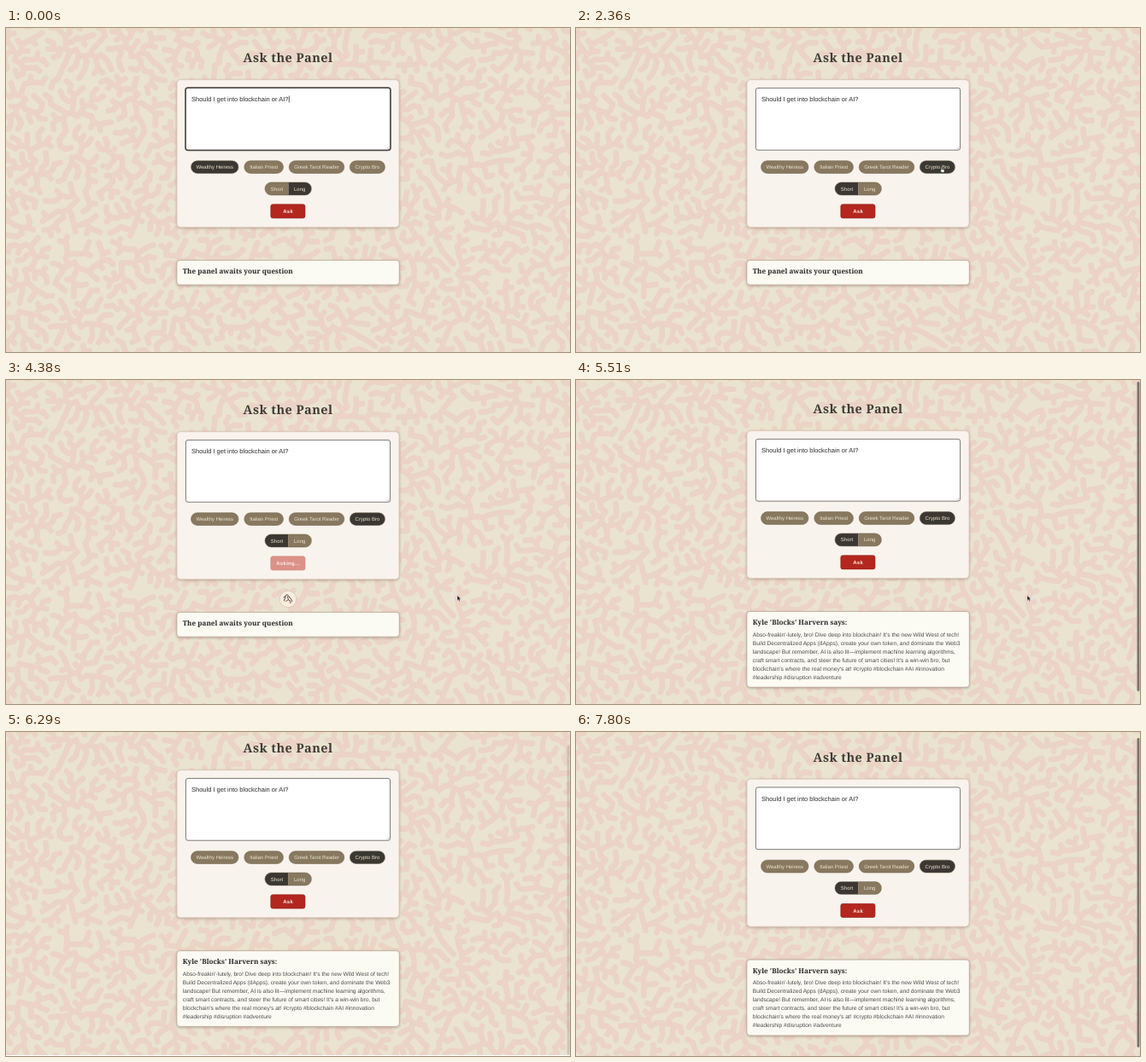
Animation, 660 px wide and 380 px high, one loop 8 s. Source, as an HTML page:

```html
<!DOCTYPE html>
<html lang="en">
<head>
<meta charset="utf-8">
<title>Ask the Panel</title>
<style>
  :root { --tan: #87785f; --dark: #3b3832; --red: #b3271f; }
  html, body { margin: 0; width: 100%; height: 100%; overflow: hidden; background: #fff; }
  svg { display: block; }
  text { font-family: "Liberation Sans", Arial, sans-serif; text-rendering: geometricPrecision; white-space: pre; }

  .serif { font-family: "Noto Serif", Georgia, serif; font-weight: 700; fill: #403c35; }
  .title { font-size: 14.5px; letter-spacing: .4px; text-anchor: middle; }
  .heading { font-size: 8.15px; fill: #2b2925; }
  .question { font-size: 7.5px; fill: #2e2c2a; }
  .answer { font-size: 6.67px; fill: #504e4c; }
  .label { font-size: 6px; fill: #ece3d0; text-anchor: middle; }
  .ask { font-weight: 700; letter-spacing: .3px; fill: #fbeee8; }
  .pill { fill: var(--tan); stroke: #6b5d47; stroke-width: .5; }
  .card { filter: drop-shadow(0 1px 1.5px rgba(90, 65, 45, .35)); stroke-width: .8; }

  /* One 8 s clock: 1% is 80 ms. */
  .page, .thumb, .bar, .cursor { animation: 8s linear infinite; }
  .page { animation-name: scroll; }
  .thumb { animation-name: thumb; }
  .bar { animation-name: bar; }
  .cursor { animation-name: point; animation-timing-function: ease-in-out; }
  .switch { animation: 8s step-end infinite; }
  .heiress { animation-name: heiress; }
  .bro { animation-name: bro; }
  .short { animation-name: short; }
  .long { animation-name: long; }
  .focus { animation-name: focus; }
  .caret { animation-name: caret; }
  .idle { animation-name: idle; }
  .busy { animation-name: busy; }
  .before { animation-name: before; }
  .after { animation-name: after; }
  .shown { animation-name: shown; }
  .arrow { animation-name: arrow; }
  .hand { animation-name: hand; }
  .spin { transform-origin: 330px 257px; animation: spin 2s linear infinite; }

  @keyframes scroll {
    0%, 68.8% { transform: translateY(0); }
    68.875% { transform: translateY(-1px); }
    70.75%, 79% { transform: translateY(-16px); }
    81.4%, 92.75% { transform: translateY(-14.5px); }
    97.5%, 100% { transform: translateY(-5.5px); }
  }
  @keyframes thumb {
    0%, 68.875% { transform: translateY(1px); }
    70.75%, 79% { transform: translateY(15px); }
    81.4%, 92.75% { transform: translateY(14px); }
    97.5%, 100% { transform: translateY(6px); }
  }
  @keyframes bar {
    0%, 68.8% { opacity: 0; }
    68.875%, 77.1% { opacity: 1; }
    78.6% { opacity: .25; }
    80%, 92.9% { opacity: 0; }
    93.6%, 100% { opacity: 1; }
  }
  @keyframes point {
    0%, 1.5% { transform: translate(390px, 262px); }
    11%, 19% { transform: translate(318px, 189px); }
    26%, 36% { transform: translate(427px, 163px); }
    43%, 48.5% { transform: translate(333px, 215px); }
    54%, 100% { transform: translate(528px, 252.5px); }
  }
  @keyframes heiress { 0% { fill: var(--dark); } 27.5%, 100% { fill: var(--tan); } }
  @keyframes bro { 0% { fill: var(--tan); } 27.5%, 100% { fill: var(--dark); } }
  @keyframes short { 0% { fill: var(--tan); } 15.6%, 100% { fill: var(--dark); } }
  @keyframes long { 0% { fill: var(--dark); } 15.6%, 100% { fill: var(--tan); } }
  @keyframes focus { 0% { opacity: 1; } 15.6%, 100% { opacity: 0; } }
  @keyframes caret { 0% { opacity: 1; } 6.25% { opacity: 0; } 12.5% { opacity: 1; } 15.6%, 100% { opacity: 0; } }
  @keyframes idle { 0% { opacity: 1; } 46% { opacity: 0; } 63.875%, 100% { opacity: 1; } }
  @keyframes busy { 0% { opacity: 0; } 46% { opacity: 1; } 63.875%, 100% { opacity: 0; } }
  @keyframes before { 0% { opacity: 1; } 63.875%, 100% { opacity: 0; } }
  @keyframes after { 0% { opacity: 0; } 63.875%, 100% { opacity: 1; } }
  @keyframes shown { 0% { opacity: 0; } 1.6% { opacity: 1; } 69.1%, 100% { opacity: 0; } }
  @keyframes hand {
    0% { opacity: 0; } 10% { opacity: 1; } 20% { opacity: 0; } 25% { opacity: 1; }
    37% { opacity: 0; } 42% { opacity: 1; } 49.5%, 100% { opacity: 0; }
  }
  @keyframes arrow {
    0% { opacity: 1; } 10% { opacity: 0; } 20% { opacity: 1; } 25% { opacity: 0; }
    37% { opacity: 1; } 42% { opacity: 0; } 49.5%, 100% { opacity: 1; }
  }
  @keyframes spin { from { transform: rotate(-68deg); } to { transform: rotate(292deg); } }
</style>
</head>
<body>
<svg width="660" height="380" viewBox="0 0 660 380">
  <defs>
    <clipPath id="toggle"><rect x="303" y="181" width="54.5" height="15" rx="7.5"/></clipPath>
    <clipPath id="sheet"><rect width="660" height="395"/></clipPath>
  </defs>

  <g class="page">
    <g clip-path="url(#sheet)">
      <rect width="660" height="395" fill="#e9e3d0"/>
      <path id="coral" fill="none" stroke="#ebd3c6" stroke-width="6.6" stroke-linecap="round" stroke-linejoin="round"/>
    </g>

    <text class="serif title" x="330" y="40.2">Ask the Panel</text>

    <rect class="card" x="200" y="60.7" width="260" height="173" rx="4.5" fill="#f9f3ed" stroke="#dcc5b5"/>
    <rect x="210.4" y="70.4" width="239.2" height="72.8" rx="2.5" fill="#fff" stroke="#5c5853" stroke-width=".8"/>
    <rect class="switch focus" x="210" y="70" width="240" height="73.6" rx="3" fill="none" stroke="#4c4641" stroke-width="1.5"/>
    <path d="M445.5 142l3-3M447.3 142l1.2-1.2" stroke="#999" stroke-width=".5"/>
    <text class="question" x="217" y="86">Should I get into blockchain or AI?</text>
    <path class="switch caret" d="M331.3 79.5v8" stroke="#222" stroke-width=".7"/>

    <g id="pills"></g>

    <g clip-path="url(#toggle)">
      <rect class="switch short" x="303" y="181" width="27.5" height="15"/>
      <rect class="switch long" x="330.5" y="181" width="27" height="15"/>
    </g>
    <rect x="303" y="181" width="54.5" height="15" rx="7.5" fill="none" stroke="#6b5d47" stroke-width=".5"/>
    <text class="label" x="317" y="190.6">Short</text>
    <text class="label" x="343.7" y="190.6">Long</text>

    <g class="switch idle">
      <rect x="309.8" y="206.8" width="40.2" height="16.2" rx="2.5" fill="#b3271f" stroke="#8f2019" stroke-width=".6"/>
      <text class="label ask" x="330.1" y="217.1">Ask</text>
    </g>
    <g class="switch busy">
      <rect x="309.8" y="206.8" width="40.2" height="16.2" rx="2.5" fill="#dc9189" stroke="#cf8880" stroke-width=".6"/>
      <text class="label ask" x="330.1" y="217.1">Asking...</text>
      <g class="spin">
        <circle cx="330" cy="257" r="9.8" fill="#f6eddf" stroke="#d9c3ae" stroke-width=".8"/>
        <g fill="none" stroke="#54433c" stroke-width="1" stroke-linecap="round">
          <path d="M325 255l4-3.5 3 3.5M327 254l-1.5 5M329.5 254l1 4 3.5 2M332 255l3 4"/>
          <path d="M327.5 259.5l2-1M332 261l1.2.4" stroke="#a3493c"/>
        </g>
      </g>
    </g>

    <g class="switch before">
      <rect class="card" x="199.9" y="272.4" width="260.4" height="28.8" rx="3.5" fill="#fbfaf3" stroke="#bda696"/>
      <text class="serif heading" x="206.8" y="288.2">The panel awaits your question</text>
    </g>
    <g class="switch after">
      <rect class="card" x="199.9" y="272.6" width="260.4" height="88.8" rx="3.5" fill="#fbfaf3" stroke="#bda696"/>
      <text class="serif heading" x="206.8" y="288.2">Kyle 'Blocks' Harvern says:</text>
      <g id="answer"></g>
    </g>
  </g>

  <g class="bar"><rect class="thumb" x="656.6" y="1" width="2.8" height="363" rx="1.4" fill="#77736e"/></g>

  <g class="switch shown">
    <g class="cursor">
      <path class="switch arrow" d="M0 0v6.4l1.5-1.3 1 2.2 1.1-.5-1-2.1h2z" fill="#111" stroke="#fff" stroke-width=".5"/>
      <path class="switch hand" d="M.1.6q.6-.8 1.1 0v2l2.4.5q.7.3.6 1l-.5 2.4H.9L-.9 4q.1-.7 1 0z" fill="#fff" stroke="#222" stroke-width=".6"/>
    </g>
  </g>
</svg>

<script>
  const $ = id => document.getElementById(id);

  const pills = [
    ["Wealthy Heiress", 216.5, 55.5, "switch heiress"],
    ["Italian Priest", 278.8, 45.7, ""],
    ["Greek Tarot Reader", 331.2, 64.6, ""],
    ["Crypto Bro", 402.3, 41.2, "switch bro"]
  ];
  $("pills").innerHTML = pills.map(([name, x, w, state]) =>
    `<rect class="pill ${state}" x="${x}" y="155.7" width="${w}" height="14.8" rx="7.4"/>
     <text class="label" x="${x + w / 2}" y="165.2">${name}</text>`).join("");

  const lines = [
    "Abso-freakin'-lutely, bro! Dive deep into blockchain! It's the new Wild West of tech!",
    "Build Decentralized Apps (dApps), create your own token, and dominate the Web3",
    "landscape! But remember, AI is also lit—implement machine learning algorithms,",
    "craft smart contracts, and steer the future of smart cities! It's a win-win bro, but",
    "blockchain's where the real money's at! #crypto #blockchain #AI #innovation",
    "#leadership #disruption #adventure"
  ];
  $("answer").innerHTML = lines.map((line, i) =>
    `<text class="answer" x="206.8" y="${301.8 + i * 10}">${line}</text>`).join("");

  // Coral wallpaper: seeded branches grow until they meet a neighbour.
  function growCoral(width, height) {
    let seed = 29;
    const rand = () => (seed = (seed * 16807) % 2147483647) / 2147483647;
    const step = 7, gap = 9.4, cell = 62, nodes = [];
    let d = "";
    for (let y = 10; y < height + 20; y += cell)
      for (let x = 10; x < width + 20; x += cell)
        nodes.push({ x: x + rand() * 34, y: y + rand() * 34, a: rand() * 2 * Math.PI });

    const isFree = (x, y, parent) => nodes.every(n =>
      n === parent || (n.x - x) ** 2 + (n.y - y) ** 2 > gap * gap);

    for (let i = 0; i < nodes.length; i++) {
      const node = nodes[i], bend = (rand() - .5) * .6;
      const side = rand() < .5 ? 1.5 : -1.5;
      const turns = rand() < .5 ? [bend - .8, bend + .8] : [bend, bend + side];
      for (const turn of turns) {
        const a = node.a + turn;
        const x = node.x + step * Math.cos(a), y = node.y + step * Math.sin(a);
        if (x < -10 || y < -10 || x > width + 10 || y > height + 10) continue;
        if (!isFree(x, y, node)) continue;
        nodes.push({ x, y, a });
        d += `M${node.x.toFixed(1)} ${node.y.toFixed(1)}L${x.toFixed(1)} ${y.toFixed(1)}`;
      }
    }
    return d;
  }
  $("coral").setAttribute("d", growCoral(660, 395));
</script>
</body>
</html>
```
